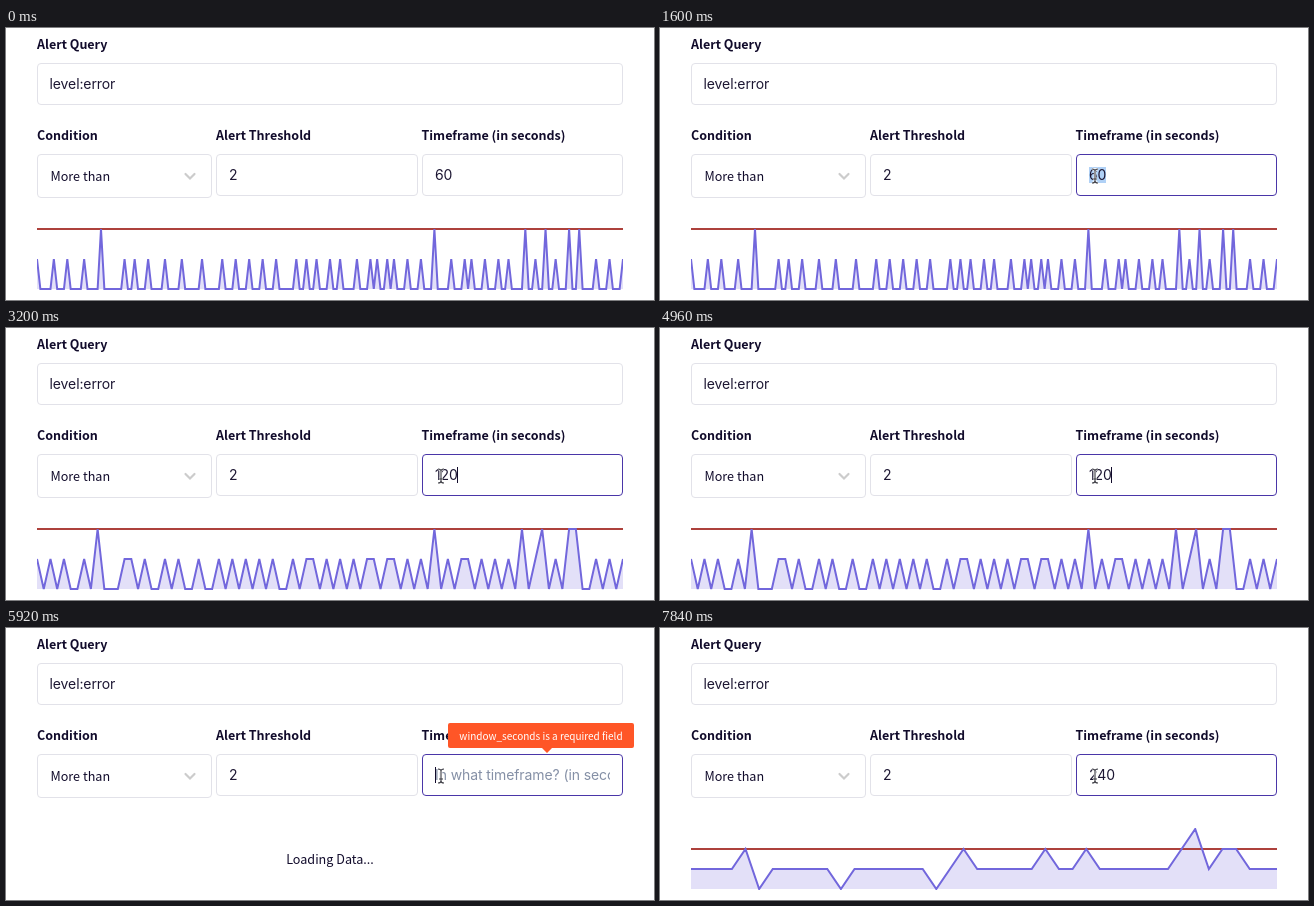
Write an HTML page that moves like this. It is 648x272 px and loops after 8000 ms.

```html
<!DOCTYPE html>
<html lang="en">
<head>
<meta charset="utf-8">
<title>Alert form</title>
<style>
html, body { margin: 0; width: 100%; height: 100%; overflow: hidden; background: #fff; }
svg { display: block; }
text { font: 12.6px "Noto Sans CJK JP", "Noto Sans CJK SC", "Noto Sans CJK", sans-serif; fill: #110b2b; white-space: pre; }
.label { font-weight: 600; font-size: 12.5px; }
.input { font: 14px Inter, sans-serif; letter-spacing: -.1px; fill: #1d1733; }
.hint { fill: #8590a6; }
.tip { font-size: 10px; fill: #fff; }
.field { fill: #fff; stroke: #e2e2e9; }
.field.focus { stroke: #4a36a8; }
</style>
</head>
<body>
<svg width="648" height="272" viewBox="0 0 648 272">
  <defs>
    <clipPath id="plotClip"><rect x="31" y="200" width="586" height="62"/></clipPath>
    <clipPath id="fieldClip"><rect x="428" y="130" width="176" height="36"/></clipPath>
  </defs>

  <text class="label" x="31" y="21">Alert Query</text>
  <text class="label" x="31" y="112">Condition</text>
  <text class="label" x="210" y="112">Alert Threshold</text>
  <text class="label" x="415.5" y="112">Timeframe (in seconds)</text>

  <rect class="field" x="31.5" y="35.5" width="585" height="41" rx="3.5"/>
  <rect class="field" x="31.5" y="126.5" width="174" height="43" rx="3.5"/>
  <rect class="field" x="210.5" y="126.5" width="201" height="41" rx="3.5"/>
  <rect class="field" id="timeField" x="416.5" y="126.5" width="200" height="41" rx="3.5"/>

  <text class="input" x="43.5" y="61">level:error</text>
  <text x="44.5" y="153">More than</text>
  <path d="M179.5 146l4.5 4.5 4.5-4.5" fill="none" stroke="#ccc" stroke-width="2.2" stroke-linecap="round"/>
  <text class="input" x="223" y="152">2</text>

  <rect id="selection" x="429" y="139" width="17" height="16" fill="#b0d1f6"/>
  <g clip-path="url(#fieldClip)">
    <text class="input" id="value" x="429" y="152"></text>
    <text class="input hint" id="hint" x="429" y="152">In what timeframe? (in seconds)</text>
  </g>
  <rect id="caret" y="139" width="1" height="16" fill="#110b2b"/>

  <g id="plot" clip-path="url(#plotClip)">
    <path id="area" fill="#e3e0f8"/>
    <path id="limit" stroke="#ad413c" stroke-width="2"/>
    <path id="line" fill="none" stroke="#7267dc" stroke-width="2"/>
  </g>
  <text id="loading" x="324" y="236" text-anchor="middle">Loading Data...</text>

  <g id="tip">
    <path d="M444 95h182q2 0 2 2v21q0 2-2 2h-80l-5 5-5-5h-92q-2 0-2-2v-21q0-2 2-2z" fill="#ff5627"/>
    <text class="tip" x="535" y="112" text-anchor="middle">window_seconds is a required field</text>
  </g>

  <g id="beam" fill="none">
    <path id="beamShape" d="M-3-7q3 0 3 2V5q0 2-3 2M3-7Q0-7 0-5M0 5q0 2 3 2M-2 3h4" stroke="#fff" stroke-width="2.4"/>
    <use href="#beamShape" style="display:none"/>
    <path d="M-3-7q3 0 3 2V5q0 2-3 2M3-7Q0-7 0-5M0 5q0 2 3 2M-2 3h4" stroke="#3a3a42" stroke-width="1.1"/>
  </g>
  <path id="arrow" d="M0 0v14l3.3-3 2.3 5.4 2.4-1-2.3-5.2H10z" fill="#000" stroke="#fff"/>
</svg>
<script>
const LOOP = 8000, TICK = 160, BLINK = 480;
const LEFT = 31, WIDTH = 586, BASE = 261;
const el = id => document.getElementById(id);
const show = (id, on) => el(id).style.display = on ? '' : 'none';

// Event slots of the finest chart; the doubled ones reach the threshold.
const hits = [0, 5, 9, 14, 19, 26, 29, 33, 38, 43, 49, 55, 59, 63, 67, 71, 77, 80, 83, 87, 90,
  95, 99, 101, 104, 106, 110, 114, 118, 123, 127, 129, 133, 137, 140, 145, 148, 151, 154,
  158, 161, 166, 170, 174];
const doubled = [19, 118, 145, 151, 158, 161];
function bucket(size) {
  const counts = Array(174 / size + 1).fill(0);
  for (const h of hits) counts[Math.floor(h / size)] = doubled.includes(h) ? 2 : 1;
  return counts;
}
const charts = {
  60: { counts: bucket(1), unit: 30 },
  120: { counts: bucket(2), unit: 30 },
  240: { counts: [...'11112011111011111101211111211211111123122111'].map(Number), unit: 20 }
};

// [time, field value, chart shown]
const edits = [[0, '60', 60], [2560, '1'], [2720, '12'], [3040, '120'], [3200, '120', 120],
  [5280, '12'], [5440, '1'], [5600, ''], [6080, '2'], [6240, '24'], [6400, '240', 240]];
// [time, x, y]
const moves = [[160, 466, 184], [640, 455, 162], [1120, 448, 157], [1280, 423, 138],
  [1440, 435, 148], [LOOP, 435, 148]];

function drawChart({ counts, unit }) {
  const step = WIDTH / (counts.length - 1);
  const points = counts.map((c, i) => `${(LEFT + i * step).toFixed(2)} ${BASE - c * unit}`).join('L');
  el('line').setAttribute('d', 'M' + points);
  el('area').setAttribute('d', `M${LEFT} ${BASE}L${points}V${BASE}z`);
  el('limit').setAttribute('d', `M${LEFT} ${BASE - 2 * unit}h${WIDTH}`);
}

function pointerAt(t) {
  const i = moves.findIndex(m => m[0] > t);
  const [t0, x0, y0] = moves[i - 1], [t1, x1, y1] = moves[i];
  const k = (t - t0) / (t1 - t0);
  return [x0 + (x1 - x0) * k, y0 + (y1 - y0) * k];
}

function render(t) {
  const past = edits.filter(e => e[0] <= t);
  const [, value, chart] = past[past.length - 1];
  const typedAt = past.find(e => e[0] && e[1] === value && e[0] >= (t >= 5280 ? 5280 : 0));

  el('value').textContent = value;
  show('hint', !value);
  show('plot', chart);
  show('loading', !chart);
  if (chart) drawChart(charts[chart]);

  el('timeField').classList.toggle('focus', t >= 480);
  show('selection', t >= 1600 && t < 2560);
  show('tip', t >= 5920 && t < 6080);

  show('caret', typedAt && Math.floor((t - typedAt[0]) / BLINK) % 2 === 0);
  const advance = value ? el('value').getComputedTextLength() : 0;
  el('caret').setAttribute('x', 429 + Math.floor(advance));

  const [x, y] = t >= 160 ? pointerAt(t) : [0, 0];
  const inField = y < 168;
  show('beam', t >= 160 && inField);
  show('arrow', t >= 160 && !inField);
  for (const id of ['beam', 'arrow']) el(id).setAttribute('transform', `translate(${x} ${y})`);
}

let last = -1;
function frame(now) {
  const t = Math.floor(now % LOOP / TICK) * TICK;
  if (t !== last) render(last = t);
  requestAnimationFrame(frame);
}
render(0);
requestAnimationFrame(frame);
</script>
</body>
</html>
```
